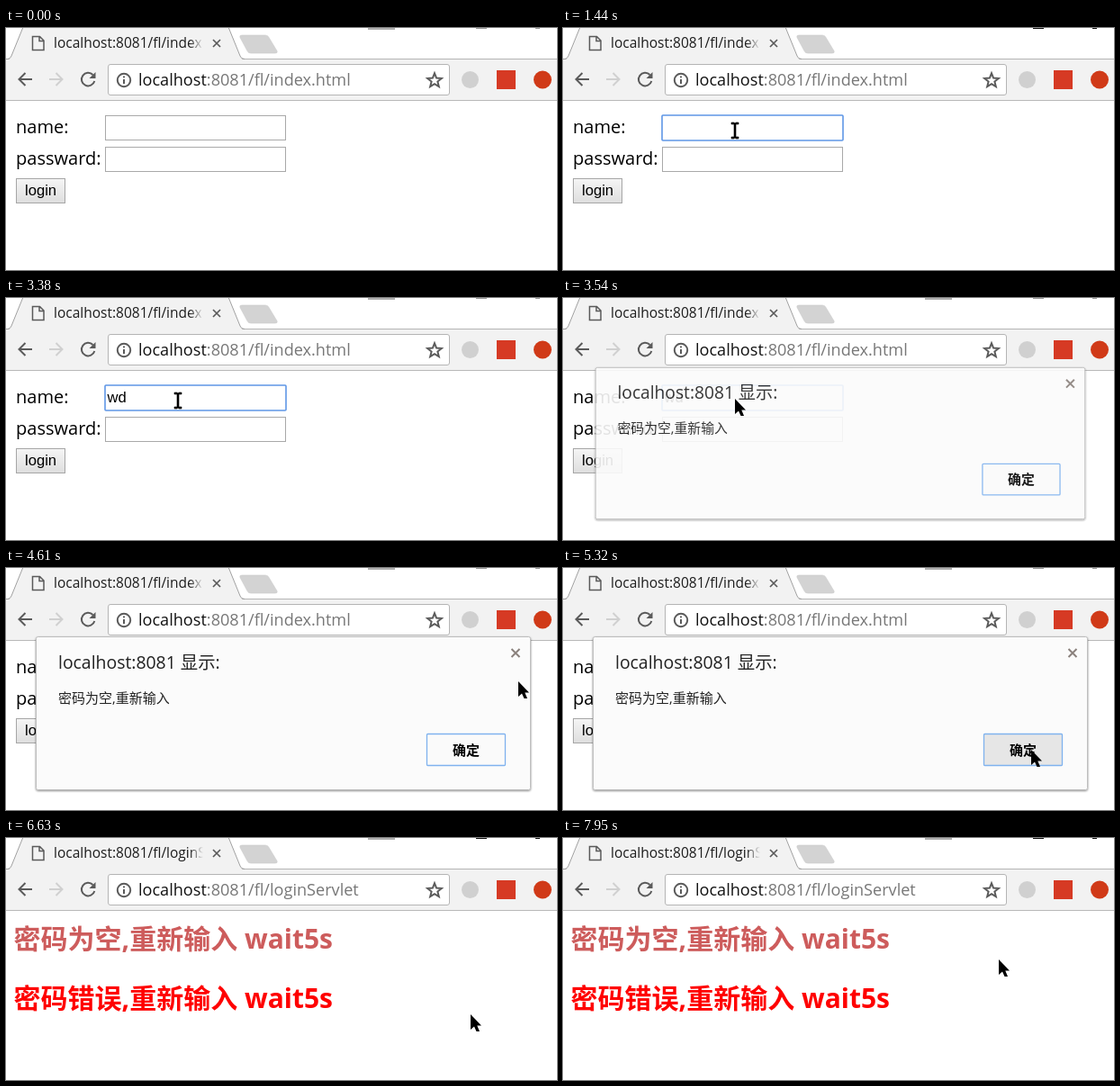
These frames come from a looping animation (612x269 px, 8 s). An HTML page:

```html
<!DOCTYPE html>
<html lang="en">
<head>
<meta charset="utf-8">
<title>Login form</title>
<style>
html, body { margin: 0; width: 100%; height: 100%; overflow: hidden; background: #fff; }
svg { display: block; }
text { font-family: "Open Sans", "Noto Sans CJK SC", "Noto Sans CJK", sans-serif; white-space: pre; }
.arial { font-family: "Liberation Sans", sans-serif; font-size: 16.6px; }
.line { fill: none; stroke: #5a5a5a; stroke-width: 2; }
.label { font-size: 20px; }
.field { fill: #fff; stroke: #a9a9a9; }
.head { font-size: 30px; font-weight: 700; }
</style>
</head>
<body>
<svg width="612" height="269" viewBox="0 0 612 269">
  <defs>
    <linearGradient id="fade" gradientUnits="userSpaceOnUse" x1="204" y1="0" x2="219" y2="0">
      <stop offset="0" stop-color="#1c1c1c"/><stop offset="1" stop-color="#1c1c1c" stop-opacity="0"/>
    </linearGradient>
    <linearGradient id="face" x1="0" y1="0" x2="0" y2="1">
      <stop offset="0" stop-color="#f5f5f5"/><stop offset="1" stop-color="#dedede"/>
    </linearGradient>
    <filter id="shadow" x="-5%" y="-5%" width="110%" height="115%">
      <feDropShadow dx="0" dy="1" stdDeviation="1.2" flood-opacity=".45"/>
    </filter>
  </defs>
  <rect width="612" height="269" fill="#fff"/>

  <g id="chrome">
    <rect id="dash" x="402" y="0" width="30" height="2" fill="#b0b0b0"/>
    <g id="marks"><rect x="522" width="12" height="1"/><rect x="588" width="5" height="1"/></g>
    <rect y="35" width="612" height="45" fill="#f2f2f2"/>
    <path d="M0 34.5H612" stroke="#b4b4b4"/>
    <path d="M2 36Q5 34 6 31L19 -1H247L260 31Q261 34 264 36Z" fill="#f2f2f2"/>
    <path d="M0 34.5H2Q5 34 6 31L19 -1M247 -1L260 31Q261 34.5 265 34.5" fill="none" stroke="#a0a0a0"/>
    <path d="M262 8H288Q291 8 292 10.500L301 25.500Q302 28 299 28H272Q269 28 268 25.500L260 10.500Q259 8 262 8Z" fill="#d3d3d3" stroke="#cbcbcb" stroke-width=".6"/>
    <path d="M29.500 9.500H37.500L42 14V24.500H29.500ZM37 9.500V14.500H42" class="line" style="stroke-width:1.5"/>
    <text id="tab" x="53" y="22" font-size="15.500" fill="url(#fade)"></text>
    <path d="M230 13L238 21M238 13L230 21" class="line" style="stroke-width:1.7"/>
    <path d="M29 57H15M21.500 50L14.500 57L21.500 64" class="line"/>
    <path d="M48 57H62M55.500 50L62.500 57L55.500 64" class="line" style="stroke:#d0d0d0"/>
    <path d="M96.500 52A7.300 7.300 0 1 0 98.300 59" class="line"/>
    <path d="M99.500 49V56H92.500Z" fill="#5a5a5a"/>
    <rect x="113.500" y="40.500" width="379" height="34" rx="2.500" fill="#fff" stroke="#b5b5b5"/>
    <circle cx="131" cy="58" r="7.200" class="line"/>
    <path d="M131 57V62M131 53.500V55.300" class="line"/>
    <text x="147" y="64" font-size="18.100" fill="#111">localhost<tspan id="path" fill="#777"></tspan></text>
    <path id="star" class="line"/>
    <circle cx="515.500" cy="57.500" r="9.500" fill="#d0d0d0"/>
    <rect x="545" y="47" width="21" height="21" fill="#d63a24"/>
    <circle cx="596" cy="57.500" r="10" fill="#d03a18"/>
    <path d="M0 80.500H612" stroke="#b9b9b9"/>
  </g>

  <g id="form">
    <text class="label" x="11" y="117">name:</text>
    <text class="label" x="11" y="152">passward:</text>
    <rect class="field" x="110.500" y="97.500" width="200" height="27"/>
    <rect id="focus" x="110" y="97" width="201" height="28" rx="1" fill="#fff" stroke="#5f97e6" stroke-width="1.600"/>
    <rect class="field" x="110.500" y="132.500" width="200" height="27"/>
    <text id="name" class="arial" x="112.500" y="116"></text>
    <rect id="caret" y="101" width="1" height="19"/>
    <rect x="11.500" y="167.500" width="54" height="27" fill="url(#face)" stroke="#a6a6a6"/>
    <text class="arial" x="21" y="186">login</text>
    <g id="list">
      <rect x="110" y="124" width="201" height="63" fill="#fff"/>
      <path d="M110.500 187V124.500H310.500V187" fill="none" stroke="#d4d4d4"/>
      <g font-weight="700"><text class="arial" x="121.500" y="146">wd</text><text class="arial" x="121.500" y="176">wdw</text></g>
    </g>
  </g>

  <g id="result">
    <text class="head" x="8.500" y="123" fill="#cd5c5c">密码为空,重新输入 wait5s</text>
    <text class="head" x="8.500" y="189" fill="#f00">密码错误,重新输入 wait5s</text>
  </g>

  <g id="dialog">
    <rect x="33.500" y="76.500" width="549" height="170" rx="2" fill="#fbfbfb" stroke="#bdbdbd" filter="url(#shadow)"/>
    <text x="58" y="112" font-size="19.400" fill="#222">localhost:8081 显示:</text>
    <text x="58" y="150" font-size="15" fill="#222">密码为空,重新输入</text>
    <path d="M561.500 90L570.500 99M570.500 90L561.500 99" stroke="#8a817c" stroke-width="2"/>
    <rect id="ok" x="467.500" y="184.500" width="87" height="35" rx="1" stroke="#7fb2ee" stroke-width="1.300"/>
    <text x="496" y="207.500" font-size="15" font-weight="700">确定</text>
  </g>

  <path id="arrow" d="M0 0V17L4 13.500L6.500 19H10L7.300 12.500H12Z"/>
  <path id="beam" d="M-4 -7H-1L0 -6L1 -7H4V-5H1V9H4V11H1L0 10L-1 11H-4V9H-1V-5H-4Z" stroke="#000" stroke-width=".6"/>
</svg>
<script>
const LOOP = 8000;
const $ = id => document.getElementById(id);
const show = (id, on) => $(id).setAttribute("display", on ? "inline" : "none");
const within = (t, a, b) => t >= a && t < b;

// Pointer moves: first and last step time, then [step, x, y] waypoints.
const moves = [
  [370, 980, [[0, 262, 275], [1, 256, 256], [5, 206, 160], [8, 191, 112], [9, 191, 112]]],
  [4150, 4920, [[0, 191, 112], [3, 400, 118], [6, 574, 120], [7, 569, 126], [11, 520, 202]]],
  [6630, 6790, [[0, 520, 202], [3, 509, 184]]],
  [7020, 7170, [[0, 509, 184], [2, 506, 146], [3, 508, 129]]],
  [7320, 7320, [[0, 508, 129], [1, 511, 125]]],
  [7800, 7950, [[0, 511, 125], [3, 484, 135]]]
];

// Dialog look by time: [time, opacity, scale].
const fades = [[0, 0, 1], [3460, .45, .97], [3540, .9, .99], [3620, 1, 1], [5400, .5, .98], [5470, 0, 1]];

function pointer(t) {
  const [start, end, pts] = moves.filter(m => t >= m[0]).pop() || moves[0];
  if (t < start) return pts[0].slice(1);
  const n = pts[pts.length - 1][0];
  const gap = (end - start) / (n - 1) || 1;
  const k = Math.min(n, 1 + Math.floor((t - start) / gap + .06));
  const i = pts.findIndex(p => p[0] >= k);
  const [k0, x0, y0] = pts[i - 1], [k1, x1, y1] = pts[i];
  const f = (k - k0) / (k1 - k0);
  return [Math.round(x0 + (x1 - x0) * f), Math.round(y0 + (y1 - y0) * f)];
}

function draw(t) {
  const typed = t < 2065 ? "" : t < 2140 ? "w" : "wd";
  const page = t < 5550 ? "index.html" : "loginServlet";
  const done = t >= 5620;
  const typing = within(t, 980, 3380);

  $("tab").textContent = "localhost:8081/fl/" + (t < 5550 ? "index" : "loginS");
  $("path").textContent = ":8081/fl/" + page;
  show("dash", !typing);
  $("marks").setAttribute("fill", typing || t >= 5470 ? "#111" : "#999");

  show("form", !done);
  show("result", done);
  show("focus", within(t, 980, 5470));
  show("list", within(t, 2065, 3380));
  $("name").textContent = typed;
  show("caret", within(t, 980, 1440) || within(t, 1990, 2600) || within(t, 3150, 3380));
  $("caret").setAttribute("x", [113, 125, 134][typed.length]);

  const [, alpha, scale] = fades.filter(f => t >= f[0]).pop();
  show("dialog", alpha > 0);
  $("dialog").setAttribute("opacity", alpha);
  $("dialog").setAttribute("transform", `translate(308 162) scale(${scale}) translate(-308 -162)`);
  $("ok").setAttribute("fill", t >= 5320 ? "#e6e6e6" : "#fafafa");

  const [x, y] = pointer(t);
  const onField = within(x, 110, 311) && (within(y, 97, 125) || within(y, 132, 160));
  const beam = onField && t < 3460;
  show("beam", beam && t >= 370);
  show("arrow", !beam && t >= 370);
  for (const id of ["beam", "arrow"]) $(id).setAttribute("transform", `translate(${x} ${y})`);
}

const star = Array.from({ length: 10 }, (_, i) => {
  const r = i % 2 ? 3.6 : 8.2, a = i * Math.PI / 5;
  return (476 + r * Math.sin(a)).toFixed(1) + " " + (58.5 - r * Math.cos(a)).toFixed(1);
});
$("star").setAttribute("d", "M" + star.join("L") + "Z");

function tick() {
  draw(performance.now() % LOOP);
  requestAnimationFrame(tick);
}
tick();
</script>
</body>
</html>
```
